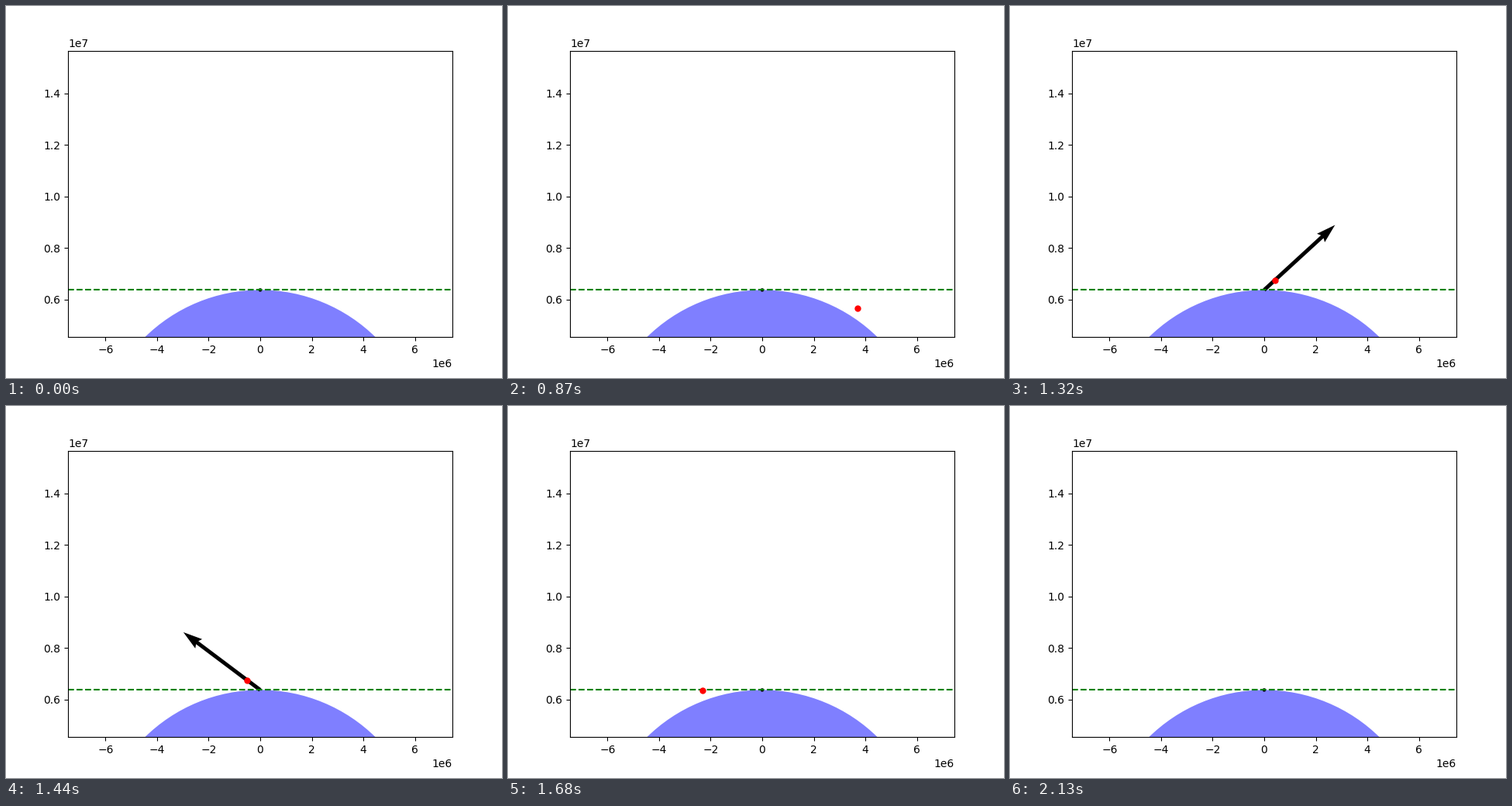
A matplotlib script for the animation above (3000 ms loop, 640 by 480 pixels).

```python
import numpy as np
import matplotlib.pyplot as plt
from matplotlib.animation import FuncAnimation

EARTH = 6.378e6         # m
ORBIT = EARTH + 400e3   # m
MU = 3.986e14           # m^3/s^2
FRAMES = 100

omega = np.sqrt(MU / ORBIT**3)
times = np.linspace(0, 3000, FRAMES)

fig, ax = plt.subplots(figsize=(6.4, 4.8), dpi=100)

# Equal scale on both axes, with the observer's sky in the middle
half_w = 1.1 * ORBIT
box = ax.get_position()
half_h = half_w * (box.height * 4.8) / (box.width * 6.4)
mid_y = EARTH + half_w / 2
ax.set_xlim(-half_w, half_w)
ax.set_ylim(mid_y - half_h, mid_y + half_h)

ax.add_patch(plt.Circle((0, 0), EARTH, facecolor="blue", alpha=0.5, lw=0))
pointer = ax.quiver([0], [EARTH], [0], [0], scale=4, width=0.01, color="black")
ax.axhline(EARTH, color="green", ls="--")
satellite, = ax.plot([], [], "ro", ms=5)


def update(i):
    angle = omega * times[i]
    x, y = ORBIT * np.cos(angle), ORBIT * np.sin(angle)
    satellite.set_data([x], [y])

    # Point at the satellite only while it is above the horizon
    u, v = 0.0, 0.0
    if y > EARTH:
        dist = np.hypot(x, y - EARTH)
        u, v = x / dist, (y - EARTH) / dist
    pointer.set_UVC([u], [v])
    return satellite, pointer


anim = FuncAnimation(fig, update, frames=FRAMES, interval=30,
                     repeat=True, repeat_delay=0)
plt.show()
```
